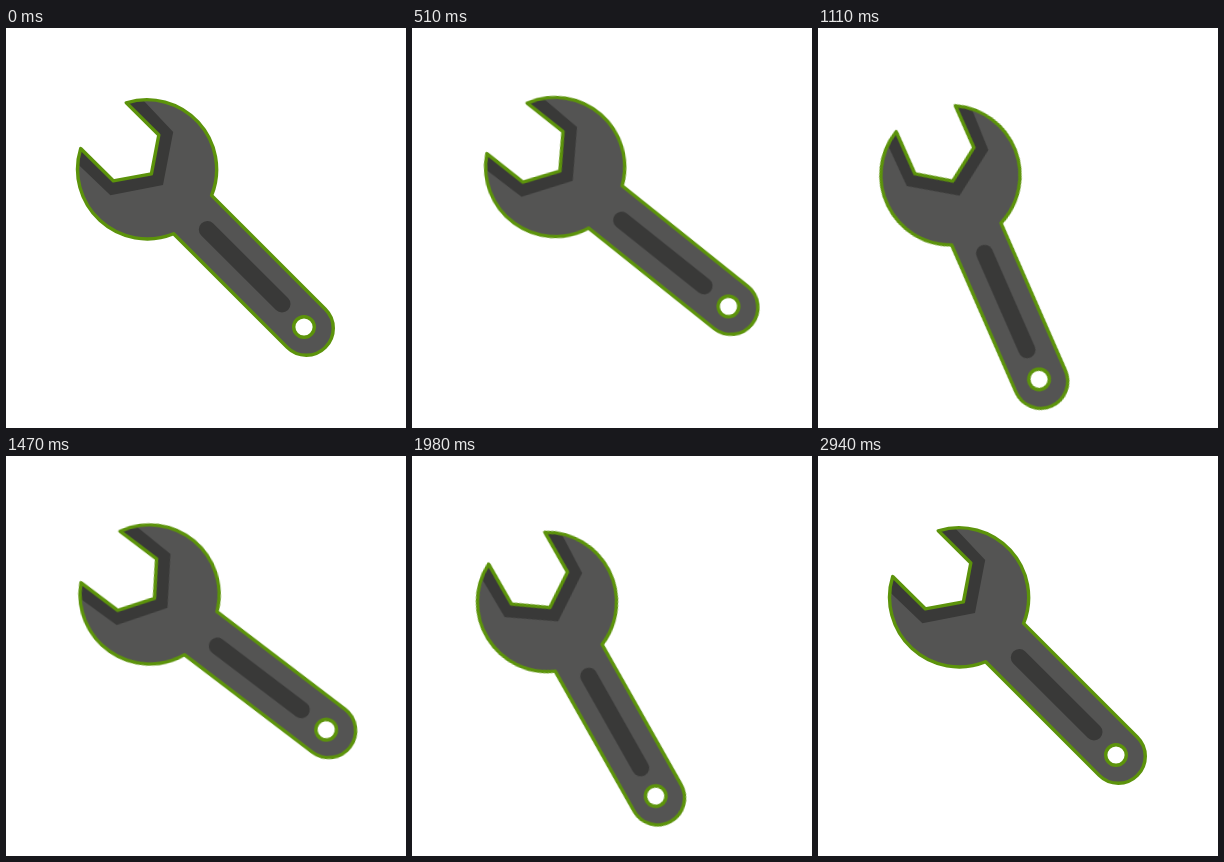
Recreate the animation shown at these times as an HTML page. Size 400 by 400 pixels, loop 4970 ms.

```html
<!DOCTYPE html>
<html lang="en">
<head>
<meta charset="utf-8">
<title>Turning wrench</title>
<style>
  html, body { margin: 0; width: 100%; height: 100%; overflow: hidden; background: #fff; }
  svg { display: block; width: 100vw; height: 100vh; }
  #wrench { transform-origin: 121px 121.4px; }
  .edge { stroke: #5c930b; stroke-width: 3.4; stroke-linejoin: round; }
</style>
</head>
<body>
<svg viewBox="0 0 400 400">
  <defs>
    <path id="body" d="M120.3 74.8 A69.7 69.7 0 0 1 205.6 167.4 L319.4 281.2
      A27 27 0 0 1 281.2 319.4 L167.6 205.8
      A69.7 69.7 0 0 1 74.7 120.5 L107.3 152.8 L145.4 145.9 L152.8 107 Z"/>
  </defs>
  <g id="wrench">
    <use href="#body" fill="#545453"/>
    <path fill="#393938" d="M120.3 74.8 A69.7 69.7 0 0 1 136.8 71.7 L167.2 104 L157 157
      L104.4 167.3 L71.7 136 A69.7 69.7 0 0 1 74.7 120.5 L107.3 152.8 L145.4 145.9 L152.8 107 Z"/>
    <path d="M201.3 201.5 L276 276" stroke="#393938" stroke-width="17" stroke-linecap="round"/>
    <use href="#body" class="edge" fill="none"/>
    <circle class="edge" cx="298" cy="299" r="10.3" fill="#fff"/>
  </g>
</svg>
<script>
  const LOOP = 4970, STEP = 30;
  const FALL = 'ease', RISE = 'cubic-bezier(.4, 0, .7, 1)';
  const LOW = -10, HIGH = 22;

  // time in ms, angle in degrees, easing towards the next pose
  const poses = [
    [0, 0, RISE],
    [180, HIGH, FALL],
    [730, LOW, RISE],
    [1091, HIGH, FALL],
    [1654, LOW, RISE],
    [2095, HIGH, FALL],
    [2500, LOW, FALL],
    [2940, 0, 'linear'],
    [LOOP, 0, 'linear']
  ];

  const swing = document.getElementById('wrench').animate(
    poses.map(([time, angle, easing]) => ({
      offset: time / LOOP,
      transform: `rotate(${angle}deg)`,
      easing
    })),
    { duration: LOOP, fill: 'both' }
  );
  swing.pause();

  const start = performance.now();
  function tick() {
    const time = (performance.now() - start) % LOOP;
    swing.currentTime = Math.floor(time / STEP) * STEP;
    requestAnimationFrame(tick);
  }
  tick();
</script>
</body>
</html>
```
